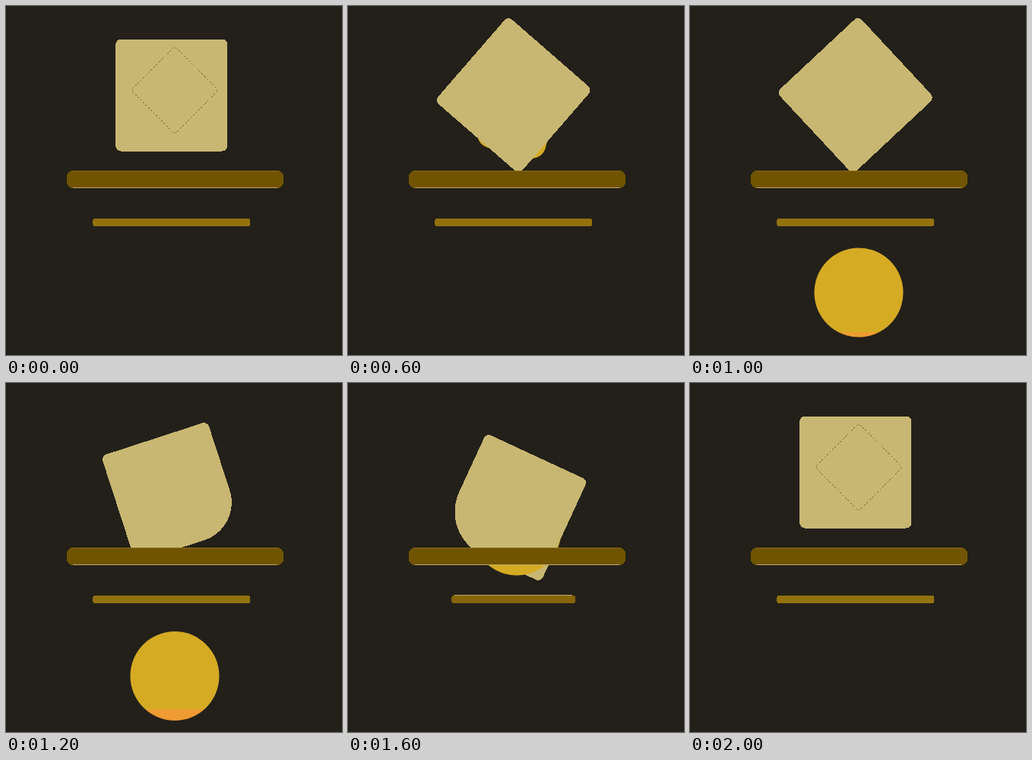
An HTML page that plays this animation: 442 by 458 pixels, repeating every 2100 ms.

```html
<!DOCTYPE html>
<html lang="en">
<head>
<meta charset="utf-8">
<title>Tumbling box and ball</title>
<style>
  html, body { margin: 0; width: 100%; height: 100%; overflow: hidden; background: #23201a; }
  svg { display: block; width: 442px; height: 458px; shape-rendering: crispEdges; }
</style>
</head>
<body>
<svg viewBox="0 0 442 458">
  <defs>
    <clipPath id="ball"><path id="ballShape"/></clipPath>
  </defs>
  <rect width="442" height="458" fill="#23201a"/>

  <rect id="shadow" y="279" height="10" rx="3"/>
  <rect id="glint" y="278" height="1" fill="#c0a860"/>

  <!-- the ball passes behind the box above the bar, in front below it -->
  <rect width="442" height="228" fill="#d6ab24" clip-path="url(#ball)"/>
  <path id="box" fill="#c8b772"/>
  <path id="outline" fill="none" stroke="#7d6518" stroke-dasharray="1 1"/>
  <rect y="228" width="442" height="200" fill="#d6ab24" clip-path="url(#ball)"/>
  <rect y="428" width="442" height="30" fill="#ee9b31" clip-path="url(#ball)"/>

  <rect x="80" y="216" width="285" height="23" rx="8" fill="#705400"/>
  <path d="M87 216.5H358" stroke="#8a6a14"/>
  <path d="M88 238.5H357" stroke="#c0a860"/>
</svg>
<script>
const LOOP = 2100, STEP = 100;
const BOX_X = 217.75, BOX_Y = 117, BOX_SIZE = 147, BALL_X = 222;
const $ = id => document.getElementById(id);

// Smooth curve through [time, value] keys, without overshoot.
function track(...keys) {
  const slope = i => (keys[i + 1][1] - keys[i][1]) / (keys[i + 1][0] - keys[i][0]);
  const tangent = i => {
    if (i === 0 || i === keys.length - 1) return 0;
    const a = slope(i - 1), b = slope(i);
    return a * b > 0 ? 2 * a * b / (a + b) : 0;
  };
  return t => {
    if (t >= keys[keys.length - 1][0]) return keys[keys.length - 1][1];
    let i = 0;
    while (t >= keys[i + 1][0]) i++;
    const [t0, v0] = keys[i], [t1, v1] = keys[i + 1];
    const d = t1 - t0, s = (t - t0) / d, r = 1 - s;
    return v0 * (1 + 2 * s) * r * r + v1 * s * s * (3 - 2 * s)
      + d * s * r * (tangent(i) * r - tangent(i + 1) * s);
  };
}

const boxTurn = track([0, 0], [400, 6.2], [600, 41], [700, 140], [800, 250], [1000, 317],
  [1200, 342], [1400, 396.5], [1600, 474.8], [1800, 522], [2000, 540]);
const boxDrop = track([0, 0], [1000, 0], [1200, 26], [1400, 80.5], [1600, 46.5], [1800, 5], [2000, 0]);
const boxCorner = track([0, 7], [1000, 7], [1200, 52], [1400, 73.5], [1600, 62], [1800, 18], [2000, 7]);
const ballY = track([0, 110.5], [400, 117.5], [600, 148], [700, 240], [800, 326.5], [1000, 376],
  [1200, 384.5], [1400, 338.5], [1600, 194], [1800, 120], [2000, 110.5]);
const ballSize = track([0, 82], [400, 82], [600, 92], [800, 117], [1600, 117], [2000, 82]);
const ballRound = track([0, .14], [400, .15], [600, .4], [800, 1], [1600, 1], [1800, .4], [2000, .14]);
const ballTurn = track([0, 45], [400, 36], [800, -200], [2000, -315]);
const shadowWidth = track([0, 207], [1200, 207], [1400, 119], [1600, 163], [1800, 203], [2000, 207]);

// Centred rounded square; the bottom right corner has its own radius.
function square(size, r, br = r) {
  const h = size / 2;
  const arc = (q, x, y) => `A${q} ${q} 0 0 1 ${x} ${y}`;
  return `M${r - h} ${-h}H${h - r}${arc(r, h, r - h)}V${h - br}${arc(br, h - br, h)}`
    + `H${r - h}${arc(r, -h, h - r)}V${r - h}${arc(r, r - h, -h)}Z`;
}

function set(id, attrs) {
  for (const name in attrs) $(id).setAttribute(name, attrs[name]);
}

function draw(t) {
  set("box", {
    d: square(BOX_SIZE, 7, boxCorner(t)),
    transform: `translate(${BOX_X} ${BOX_Y + boxDrop(t)}) rotate(${boxTurn(t)})`
  });

  const size = ballSize(t);
  const ball = {
    d: square(size, size / 2 * ballRound(t)),
    transform: `translate(${BALL_X} ${ballY(t)}) rotate(${ballTurn(t)})`
  };
  set("ballShape", ball);
  set("outline", { ...ball, visibility: t < 600 || t > 1800 ? "visible" : "hidden" });

  const width = shadowWidth(t), x = BOX_X - width / 2;
  const k = (207 - width) / 88;
  const tone = [147 - 28 * k, 114 - 28 * k, 14 - 14 * k].map(Math.round);
  set("shadow", { x, width, fill: `rgb(${tone})` });
  set("glint", { x: x + 4, width: width - 8, visibility: k > .3 ? "visible" : "hidden" });
}

const start = performance.now();
function frame() {
  const t = (performance.now() - start) % LOOP;
  draw(Math.floor(t / STEP) * STEP);
  requestAnimationFrame(frame);
}
frame();
</script>
</body>
</html>
```
